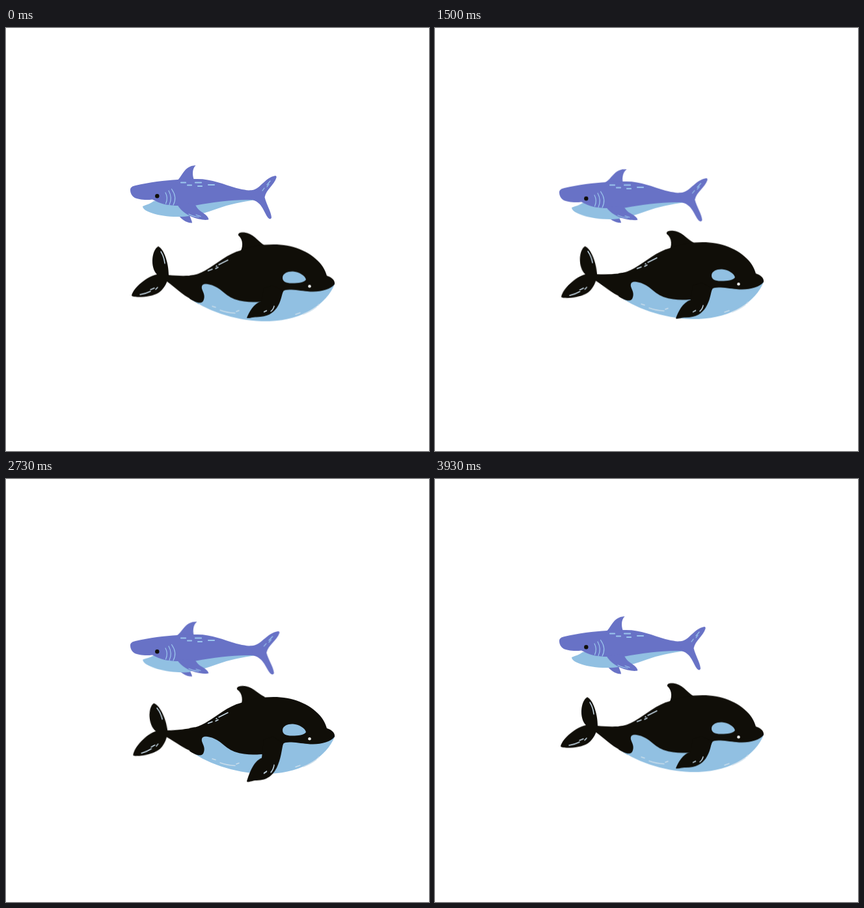
Recreate the animation shown at these times as an HTML page. Size 650x650 px, loop 3.96 s.

```html
<!DOCTYPE html>
<html lang="en">
<head>
<meta charset="utf-8">
<title>Shark and orca</title>
<style>
  html, body { margin: 0; width: 100%; height: 100%; overflow: hidden; background: #fff; }
  svg { display: block; width: 100vw; height: 100vh; }

  .black { fill: #100e08; }
  .blue { fill: #91c0e2; }
  .purple { fill: #6872c6; }
  .line { fill: none; stroke-linecap: round; stroke-width: 1.5; }
  .pale { stroke: #c9dcea; }
  .sky { stroke: #9cc8ee; }
  .thin { stroke-width: 1.2; }

  /* Swinging parts: half a swing lasts 990 ms, two full swings per loop */
  .swing { animation: 990ms cubic-bezier(.37, 0, .63, 1) infinite alternate; }
  .orca { animation-name: bob; animation-delay: -495ms; }
  .orca-tail { transform-origin: 286px 397px; animation-name: flap; animation-delay: -20ms; }
  .orca-dorsal { transform-origin: 378px 338px; animation-name: lean; animation-delay: -20ms; }
  .orca-fin { transform-origin: 400px 403px; animation-name: paddle; animation-delay: -130ms; }
  .shark { animation-name: sink; }
  .jaw { transform-origin: 265px 276px; animation-name: bite; }

  /* Parts with a pattern over the whole loop */
  .loop { animation: 3960ms ease-in-out infinite; }
  .shark-tail { transform-origin: 370px 257px; animation-name: stretch; }
  .shark-fin { transform-origin: 280px 272px; animation-name: tuck; }
  .shark-dorsal { transform-origin: 277px 234px; animation-name: tilt; }

  @keyframes bob { from { transform: translateY(-3.8px); } to { transform: translateY(3px); } }
  @keyframes flap { from { transform: rotate(0deg); } to { transform: rotate(-7.7deg); } }
  @keyframes lean { from { transform: rotate(0deg); } to { transform: rotate(-7deg); } }
  @keyframes paddle { from { transform: scaleY(.97); } to { transform: scaleY(1.4); } }
  @keyframes sink { from { transform: translateY(0); } to { transform: translateY(8px); } }
  @keyframes bite { from { transform: rotate(0deg); } to { transform: rotate(4.2deg); } }
  @keyframes stretch {
    0%, 100% { transform: scaleX(1); }
    16% { transform: scaleX(1.1); }
    28.5% { transform: scaleX(1.055); }
    46% { transform: scaleX(1.075); }
    56%, 81.5% { transform: scaleX(1.1); }
  }
  @keyframes tuck {
    0%, 99%, 100% { transform: scaleY(1); }
    16% { transform: scaleY(.86); }
    28.5% { transform: scaleY(.9); }
    46% { transform: scaleY(.83); }
    56% { transform: scaleY(.97); }
    81.5% { transform: scaleY(.82); }
  }
  @keyframes tilt {
    0%, 28.5%, 97%, 100% { transform: rotate(0deg); }
    42%, 50% { transform: rotate(10deg); }
    56% { transform: rotate(8.5deg); }
    81.5% { transform: rotate(1.5deg); }
  }
</style>
</head>
<body>
<svg viewBox="0 0 650 650">
  <g class="swing shark">
    <path class="loop shark-fin purple" d="M262 284C268 293 277 300 286 299.500C286 296 283 292 281 284Z"/>
    <path class="blue" d="M384 264C362 267 343 271 325 277.500C308 284 290 289 270 289.500L258 270L300 265L360 258Z"/>
    <path class="swing jaw blue" d="M210 274C217 271 222 270 227 266L265 266L288 276L284 288.500C262 292 238 289 226 285C216 282 210 278 210 274Z"/>
    <g class="loop shark-dorsal">
      <path class="purple" d="M261 236C271 230 272 212 291.500 211C285.500 217 286 227 290 236Z"/>
    </g>
    <path class="purple" d="M191 249C191 245 194 243 199 242C220 237 244 234 264 233L290 232C315 231 333 240 354 246C366 249 375 250 383 250L387 257L382 264.500C358 262.500 322 267 292 272.500L264 273C252 273 240 271 230 266L225 263.500C213 265 202 263 198 261C193 258 191 253 191 249Z"/>
    <g class="loop shark-tail">
      <path class="purple" d="M374 249.500C391 250 396 230 414 227C415 227 416 228 415.500 230C412 241 400 248 397.500 260C400 271 407 281 408 291C407.500 294 405 294 403 292C396 283 394 269 380 264.500Z"/>
      <path class="line sky thin" d="M406 235L401 241M404 240L401 244M397 246L394 250"/>
    </g>
    <g class="loop shark-fin">
      <path class="purple" d="M263 271C269 282 281 290 296 293.500C303 295 309 295.500 311.500 294C310 287 300 283 296.500 279.500C293 276 292 273 289 269Z"/>
      <path class="line sky thin" d="M281 286Q288 290 296 290.500M292 287L299 289.500"/>
    </g>
    <path class="line sky" style="stroke-width:2.200" d="M269 237.500H276M291 237.500H300M279 241.500H285M295 243H301M311 241H320"/>
    <path class="line sky thin" d="M245 253Q249.500 261 245.500 270M250 250Q256 261 251 271.500M254.500 247.500Q263.500 260 257 272"/>
    <circle class="black" cx="232.300" cy="258.200" r="3.200"/>
  </g>

  <g class="swing orca">
    <g class="swing orca-tail">
      <path class="blue" d="M248 388Q268 407 296 425L300 408Z"/>
      <path class="black" d="M292 380C275 382 262 381 250 380C250 362 243 340 234 336C224 341 221 368 232 379C217 382 196 399 193 411.500C194 415 222 415 234 407.500C241 403 245 396 247.500 390C259 398 270 410 286 418L294 418Z"/>
      <path class="line pale" d="M238 344Q243 352 244 362M206 410Q214 409 222 405M222 402.500L228 400M230 402L233 399"/>
    </g>
    <path class="blue" d="M283 416C315 439 362 452 405 451C457 449 493 424 505 394L440 380L300 385Z"/>
    <g class="swing orca-dorsal">
      <path class="black" d="M358 348C365 338 365 326 357 319C356 315 361 314 366 314.500C380 316 386 327 398 335L394 350Z"/>
    </g>
    <path class="black" d="M282 381C291 380 299 377 306 373C325 362 341 347 361 342C375 336 394 333 411 333C440 333 466 343 482 361C488 368 491 374 493 381C500 383 506 388 505 394C498 403 480 407 463 405C450 404 430 400 426 405C422 415 412 422 392 421C379 422 366 422 351 417C334 410 329 397 310 394C303 393 300 395 301 401C303 407 307 412 303 420C299 425 291 422 282 416Z"/>
    <g class="swing orca-fin">
      <path class="black" d="M393 420C380 424 374 437 370 446C371 448 378 445 385 445C402 445 410 439 416 431C423 420 423 413 426 404L410 396L396 400Z"/>
      <path class="line pale" d="M396.500 437L400.500 435M407 436Q411 433 412 428"/>
    </g>
    <path class="blue" d="M425 384C425 377 434 374 441 374.500C450 375 460 381 461 387C458 392 445 393 436 392.500C428 391.500 425 389 425 384Z"/>
    <circle cx="466.500" cy="397.300" r="2.300" fill="#f4f6f5"/>
    <path class="line pale" d="M327 364L341 357M310.500 373.500L317 371M322 370L326 368M323 366.500L324 366M317 428L322 429.500M329 434Q340 438 352 438.500M354 436L358 434.500M445 440.500L452 438M457 440Q468 436 477 429M479 427L481 425"/>
  </g>
</svg>
</body>
</html>
```
